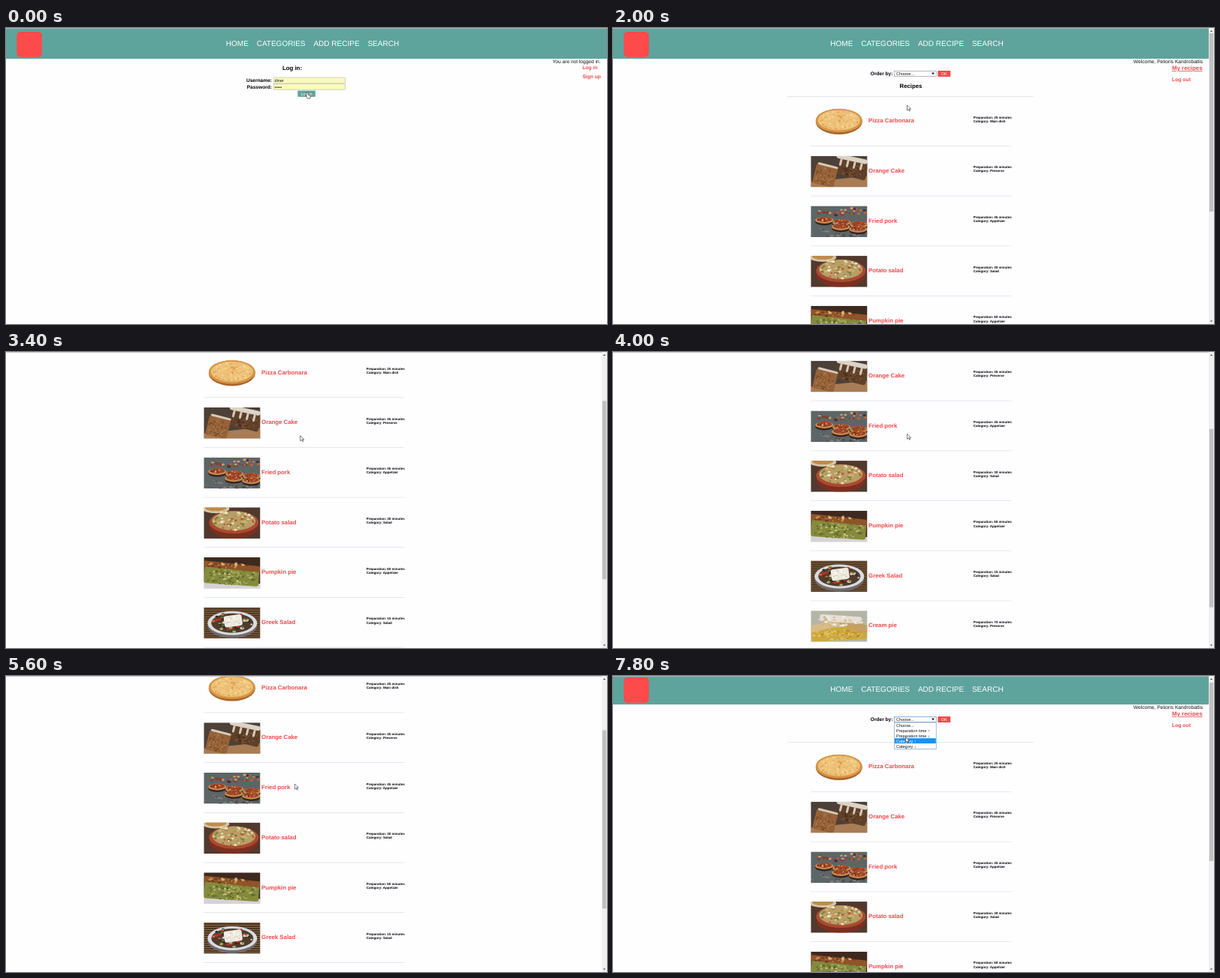
An HTML page that plays this animation: 800 px wide and 395 px high, repeating every 8 s.

```html
<!DOCTYPE html>
<html lang="en">
<head>
<meta charset="utf-8">
<title>Recipe site</title>
<style>
html, body { margin: 0; width: 100%; height: 100%; overflow: hidden; background: #fefdff; }
svg { display: block; width: 100vw; height: 100vh; }
text { font-family: "Liberation Sans", Arial, sans-serif; text-rendering: geometricPrecision; white-space: pre; }
.b { font-weight: bold; }
</style>
</head>
<body>
<svg id="stage" viewBox="0 0 800 395" preserveAspectRatio="none"></svg>
<script>
const TEAL = '#5fa39d', RED = '#f04a4a', RULE = '#e4e2e4', PAPER = '#fefdff';
const STEP = 200, LOOP = 8000, PITCH = 66.7, ROW_H = 6.9;
const PHOTO_W = 75.2, PHOTO_H = 41.6;

// Drawing helpers, each returning markup
const rect = (x, y, w, h, fill, more = '') => `<rect x="${x}" y="${y}" width="${w}" height="${h}" fill="${fill}" ${more}/>`;
const oval = (x, y, rx, ry, fill) => `<ellipse cx="${x}" cy="${y}" rx="${rx}" ry="${ry}" fill="${fill}"/>`;
const slab = (x, y, w, h, turn, fill) => rect(x - w / 2, y - h / 2, w, h, fill, `rx="3" transform="rotate(${turn} ${x} ${y})"`);
const path = (d, fill, more = '') => `<path d="${d}" fill="${fill}" ${more}/>`;
const text = (s, x, y, size, fill = '#111', more = '') => `<text x="${x}" y="${y}" font-size="${size}" fill="${fill}" ${more}>${s}</text>`;
const bold = (s, x, y, size, fill = '#000', more = '') => text(s, x, y, size, fill, 'class="b" ' + more);
const group = (id, body) => `<g id="${id}">${body}</g>`;
const fill = color => rect(0, 0, PHOTO_W, PHOTO_H, color);
const repeat = (n, draw) => Array.from({ length: n }, (_, i) => draw(i)).join('');
const END = 'text-anchor="end"', MID = 'text-anchor="middle"';

// Random crumbs spread over an ellipse
function crumbs(cx, cy, rx, ry, size, ...colors) {
  let seed = Math.round(cx * 97 + cy * 31 + rx) * 7919;
  const random = () => (seed = (seed * 16807) % 2147483647) / 2147483647;
  return repeat(Math.round(0.6 * rx * ry / size ** 2), i => {
    const a = random() * 2 * Math.PI, d = Math.sqrt(random()), r = size * (0.6 + random() * 0.7);
    return oval(cx + rx * d * Math.cos(a), cy + ry * d * Math.sin(a), r, r * 0.7, colors[i % colors.length]);
  });
}

const bowl = (y, rim, inside) => oval(38, y + 3, 33, 17, '#6f6a6c') + oval(38, y, 33, 16, rim) + oval(38, y, 28, 13, inside);

const toast = (x, y) => oval(x, y + 3, 12, 5, '#33251f') + oval(x, y + 1, 12, 4.5, '#c98d55') +
  oval(x, y, 10, 3.5, '#9c4427') + crumbs(x, y, 9, 3, 1, '#cf6238', '#dba666', '#622c1c');

const art = {
  pizza: () => oval(37.5, 21, 31, 17, '#a9652c') + oval(37.5, 19.5, 31, 15.8, '#d59545') + oval(37.5, 19, 28, 13.5, '#edc077') +
    crumbs(37.5, 19, 26, 12, 1.4, '#f5d796', '#dfa04f', '#f0cb86'),

  cake: () => fill('#4c4038') + slab(45, 39, 100, 18, -6, '#a87c54') +
    slab(56, 15, 40, 27, 14, '#60402a') + crumbs(56, 20, 15, 9, 1.2, '#47301f', '#7c5433') +
    slab(55, 4, 42, 6, 12, '#ddd2c6') + repeat(4, i => slab(40 + i * 9, 8 + i * 2, 3, 11, 14, '#d5c9bb')) +
    slab(19, 26, 29, 27, 14, '#956239') + crumbs(18, 27, 12, 11, 1.1, '#70451f', '#b07c4a') +
    slab(23, 13, 28, 3, 14, '#d9c9b5'),

  pork: () => fill('#5d6566') + crumbs(38, 36, 40, 7, 2, '#7b8180', '#464c4d', '#6d625a') +
    crumbs(40, 7, 36, 6, 2, '#8c3e29', '#3e3634', '#b9623d', '#d29a68') +
    repeat(5, i => toast(18 + i * 23 % 47, 18 + i * 3)),

  potato: () => fill('#51392e') + oval(16, 2, 18, 6, '#d5c5a8') + oval(16, 1, 14, 4, '#bd8c4b') +
    oval(40, 25, 33, 17, '#7c2f20') + oval(40, 20, 33, 15, '#a94b32') + oval(40, 18, 29, 13, '#b99e66') +
    crumbs(40, 17, 28, 13, 1.9, '#e8d9a8', '#cfb673', '#7c803f', '#f0e7c7', '#a88a50', '#b95032'),

  pumpkin: () => fill('#3f291f') + slab(40, 42, 100, 16, 2, '#d5d3d3') +
    slab(37, 25, 73, 23, 4, '#858a3c') + crumbs(37, 26, 35, 11, 1.5, '#a5a754', '#55622a', '#c3c084', '#6c7733') +
    slab(37, 12, 76, 8, 6, '#8f5429') + crumbs(34, 10, 32, 4, 1.8, '#c68b4d', '#70391c', '#deb076'),

  greek: () => fill('#4b3523') + repeat(14, i => rect(0, i * 3, PHOTO_W, 1, '#8a6843')) + bowl(21, '#d9dbe0', '#503c2c') +
    crumbs(38, 20, 27, 13, 2.3, '#b53427', '#637c34', '#2f2928', '#cf6a4c', '#a4ad62', '#d8d2c2') +
    slab(39, 18, 24, 15, -8, '#eeeae0') + crumbs(39, 18, 10, 6, 1, '#d3cebd', '#fff'),

  cream: () => fill('#b5b5a6') + slab(38, 31, 74, 17, -3, '#cda83f') + crumbs(38, 32, 35, 7, 1.5, '#e6c75c', '#b78a2c', '#dcc06d') +
    slab(20, 20, 44, 9, -14, '#d8bb85') + slab(58, 20, 40, 10, 16, '#c59f65') +
    slab(40, 11, 56, 9, 4, '#e6dfd3') + crumbs(40, 14, 34, 7, 2, '#f0ebe2', '#cfb48a', '#dccdb1'),

  pasta: () => fill('#45271e') + crumbs(38, 4, 40, 5, 2, '#82332a', '#5f2a20') + bowl(26, '#d8d1cc', '#b5672f') +
    crumbs(38, 18, 22, 13, 2, '#7d2d17', '#b64c25', '#d18c48', '#963718')
};

const dishes = [
  ['Pizza Carbonara', 25, 'Main dish', art.pizza], ['Orange Cake', 45, 'Preserve', art.cake],
  ['Fried pork', 45, 'Appetizer', art.pork], ['Potato salad', 30, 'Salad', art.potato],
  ['Pumpkin pie', 60, 'Appetizer', art.pumpkin], ['Greek Salad', 15, 'Salad', art.greek],
  ['Cream pie', 70, 'Preserve', art.cream], ['Spaggeti with meat', 40, 'Main dish', art.pasta]
];

const dishRow = ([name, minutes, kind, draw], i) => `<g transform="translate(263.3 ${104 + i * PITCH})">
  <g clip-path="url(#photo)"><g filter="url(#soft)">${draw()}</g></g>
  ${bold(name, 76.8, 22.3, 7.8, RED, `id="dish${i}"`)}
  ${bold(`Preparation: ${minutes} minutes`, 216.5, 16.7, 4.48)}
  ${bold(`Category: ${kind}`, 216.5, 21.8, 4.48)}
  ${rect(0, 53, 267, 0.8, RULE)}</g>`;

const navItems = ['HOME', 'CATEGORIES', 'ADD RECIPE', 'SEARCH'].map((s, i) => `<tspan dx="${i ? 10.9 : 0}">${s}</tspan>`).join('');
const header = rect(0, 0, 800, 41, TEAL) + rect(14.3, 5, 33.5, 33.7, '#fd4a4a', 'rx="5"') +
  group('nav', text(navItems, 289.3, 24, 10, '#fff'));

const field = (label, value, y) => bold(label, 354, y, 6.6, '#000', END) +
  rect(356.2, y - 5.9, 95.4, 7.7, '#fafbbd', 'stroke="#b5b5a0" stroke-width=".6" rx=".8"') + text(value, 357.6, y, 5.5);
const button = (label, x, y, w, h, color) => rect(x, y, w, h, color) + text(label, x + w / 2, y + h / 2 + 2, 5.6, '#fff', MID);

const login = bold('Log in:', 368, 55.8, 7.8) +
  field('Username:', 'diner', 72) + field('Password:', '•••••', 80.5) + button('Log in', 388.3, 83.6, 23.5, 8.2, TEAL) +
  text('You are not logged in.', 791.5, 47, 6.6, '#111', END) +
  bold('Log in', 767.2, 54.5, 6.7, RED) + bold('Sign up', 767.4, 67.2, 6.7, RED);

const account = text('Welcome, Pelioris Kandrobatlis', 785, 47, 6.68, '#111', END) +
  bold('My recipes', 744, 56, 7.85, RED, 'text-decoration="underline"') + bold('Log out', 744, 71.4, 6.8, RED);

const list = bold('Order by:', 342.8, 63, 6.6) +
  rect(374.6, 57.4, 55.6, 7.2, '#fff', 'id="select" stroke="#999" stroke-width=".7"') +
  text('Choose...', 377, 62.9, 5.6) + path('M424.2 59.6h3.6l-1.8 3z', '#111') + button('OK', 432.4, 57, 16.8, 8, RED) +
  bold('Recipes', 381.5, 79.7, 7.8) + rect(232, 91.2, 328, 0.8, RULE) + dishes.map(dishRow).join('');

const options = ['Choose...', 'Preparation time ↑', 'Preparation time ↓', 'Category ↑', 'Category ↓'];
const menu = rect(374.6, 62, 55.6, 35.4, '#fff', 'stroke="#7f9fc8" stroke-width=".7"') +
  rect(375, 62.4, 54.8, ROW_H, '#1e90f0', 'id="mark"') +
  options.map((s, i) => text(s, 377, 67.9 + i * ROW_H, 5.5, '#111', 'class="option"')).join('');

const scrollbar = rect(793, 0, 7, 395, '#f1f0f1') + rect(793.8, 0, 5.4, 238, '#c1c0c1', 'id="thumb"') +
  path('M794.8 5h3.4l-1.7-2zM794.8 390.6h3.4l-1.7 2z', '#555');

const status = rect(0, 387, 266.5, 8, '#e9e8e9') +
  text('testbench/DishPile/detail.php?no=1&amp;pic_no=2.jpg', 1, 393.4, 5.25, '#666');

const outline = 'stroke="#222" stroke-width=".6" stroke-linejoin="round"';
const arrow = path('M0 0V7L2 5.4 3 8 4 7.4 3 5H5Z', '#fff', outline);
const hand = path('M0 1Q1 0 2 1V4L5 5V9H1L-1 5 0 6Z', '#fff', outline);

const stage = document.getElementById('stage');
stage.innerHTML = `<clipPath id="photo"><rect width="${PHOTO_W}" height="${PHOTO_H}"/></clipPath>
  <filter id="soft"><feGaussianBlur stdDeviation=".5"/></filter>` + rect(0, 0, 800, 395, PAPER) +
  group('page', header + group('login', login) + group('account', account) + group('list', list)) +
  rect(0, 0, 800, 0.8, '#b9b9b9') + group('scrollbar', scrollbar) + group('status', status) +
  group('menu', menu) + group('arrow', arrow) + group('hand', hand);

const el = {};
stage.querySelectorAll('[id]').forEach(node => el[node.id] = node);
const optionTexts = [...stage.querySelectorAll('.option')];

// Key points: time, then values
const scrollKeys = [[2600, 0], [2800, 34.5], [4000, 159], [4800, 199.7], [5600, 108.5], [6000, 3]];
const pointerKeys = [[600, 400, 85], [2000, 391.5, 103], [2800, 391.8, 114], [4000, 391.6, 109.3],
  [4800, 391.8, 109.3], [5600, 384.3, 144], [7200, 397, 60], [7800, 389.5, 81.5]];

function at(keys, t) {
  const next = keys.findIndex(k => k[0] > t);
  if (next === 0) return keys[0].slice(1);
  if (next < 0) return keys.at(-1).slice(1);
  const [t0, ...from] = keys[next - 1], [t1, ...to] = keys[next];
  return from.map((v, i) => v + (to[i] - v) * (t - t0) / (t1 - t0));
}

const show = (node, on) => node.setAttribute('display', on ? 'inline' : 'none');
const move = (node, x, y) => node.setAttribute('transform', `translate(${x} ${y})`);

function render(now) {
  const t = Math.floor(now % LOOP / STEP) * STEP;
  const [scroll] = at(scrollKeys, t), [x, y] = at(pointerKeys, t);
  const loggedIn = t >= 1000, listed = t >= 1400, open = t >= 7400;
  const hover = t >= 2600 && t < 3000;

  move(el.page, 0, -scroll);
  move(el.nav, listed ? 0 : 3.5, 0);
  move(el.account, listed ? 0 : 7, 0);
  show(el.login, !loggedIn);
  show(el.account, loggedIn);
  show(el.list, listed);
  show(el.scrollbar, listed);
  el.thumb.setAttribute('y', 7 + scroll * 0.602);
  show(el.status, hover);
  el.dish0.setAttribute('fill', hover ? TEAL : RED);

  const row = Math.max(0, Math.floor((y - 60) / ROW_H));
  show(el.menu, open);
  el.select.setAttribute('stroke', open ? '#5f8fd0' : '#999');
  el.mark.setAttribute('y', 62.4 + row * ROW_H);
  optionTexts.forEach((o, i) => o.setAttribute('fill', i === row ? '#fff' : '#111'));

  show(el.hand, !loggedIn);
  show(el.arrow, loggedIn);
  move(el.hand, x, y);
  move(el.arrow, x, y);
}

let start;
function tick(now) {
  start ??= now;
  render(now - start);
  requestAnimationFrame(tick);
}
render(0);
requestAnimationFrame(tick);
</script>
</body>
</html>
```
